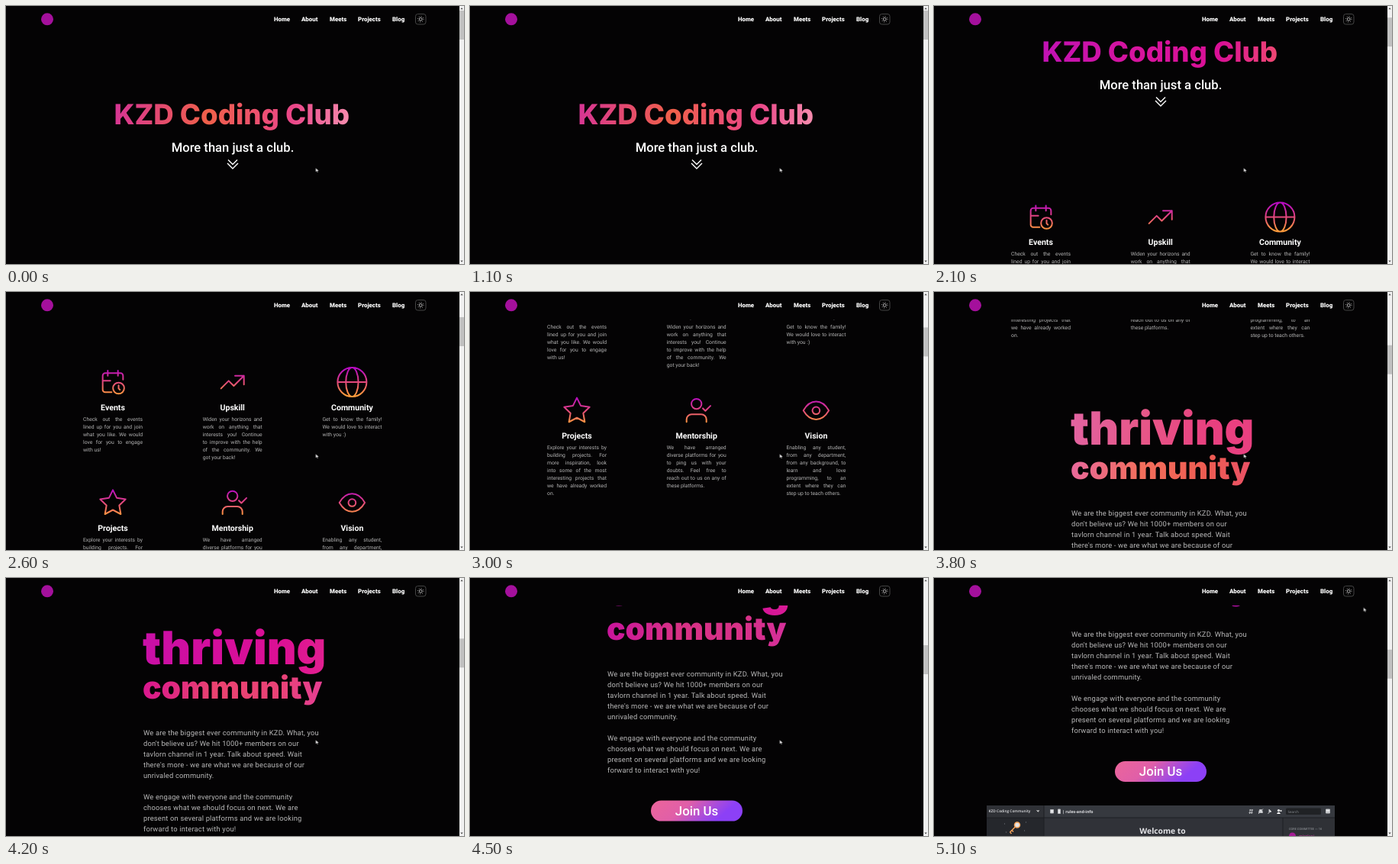
These frames come from a looping animation (600x338 px, 5.4 s). An HTML page:

```html
<!DOCTYPE html>
<html lang="en">
<head>
<meta charset="utf-8">
<title>Coding club</title>
<style>
@property --scroll { syntax: "<number>"; inherits: true; initial-value: 0; }
@property --a { syntax: "<color>"; inherits: false; initial-value: #000; }
@property --b { syntax: "<color>"; inherits: false; initial-value: #000; }
@property --c { syntax: "<color>"; inherits: false; initial-value: #000; }
@property --d { syntax: "<color>"; inherits: false; initial-value: #000; }

html, body { margin: 0; width: 100%; height: 100%; overflow: hidden; background: #040304; }
#stage {
  position: relative; width: 600px; height: 338px; overflow: hidden;
  background: #040304; color: #fff; font-family: Roboto, sans-serif;
  text-rendering: geometricPrecision;
  animation: scroll 5.4s infinite;
}
#stage * { position: absolute; margin: 0; white-space: nowrap; }
#stage svg, #stage svg * { position: static; }
#stage svg { position: absolute; left: 0; top: 0; }
#page { left: 0; top: 0; width: 594px; height: 1140px; transform: translateY(calc(var(--scroll) * -1px)); }

@keyframes scroll {
  0% { --scroll: 0; }
  29.62% { --scroll: 0; animation-timing-function: steps(5); }
  38.88% { --scroll: 82; animation-timing-function: steps(5); }
  48.14% { --scroll: 240.5; animation-timing-function: steps(8); }
  62.96% { --scroll: 482; animation-timing-function: steps(8); }
  77.77% { --scroll: 655; animation-timing-function: steps(5); }
  87.03%, 100% { --scroll: 784; }
}

/* Gradient lettering */
.glow {
  font: 900 36.6px/1.2 Inter, sans-serif; color: transparent;
  background: linear-gradient(100deg, var(--a), var(--b) 40%, var(--c) 75%, var(--d));
  -webkit-background-clip: text; background-clip: text;
}
#title { left: 295.8px; top: 120.7px; translate: -50% 0; font-weight: 800; animation: title 5.4s infinite; }
#thriving { left: 179px; top: 711.2px; font-size: 60px; animation: thriving 5.4s infinite; }
#community { left: 179px; top: 773.7px; font-size: 40.8px; animation: community 5.4s infinite; }
@keyframes title {
  0%, 29.62% { --a: #d63496; --b: #f0604a; --c: #ea4688; --d: #f78fb0; animation-timing-function: steps(5); }
  38.88%, 100% { --a: #c012b4; --b: #d6149e; --c: #da1096; --d: #f04a70; }
}
@keyframes thriving {
  0%, 62.96% { --a: #f9b89c; --b: #fa9f74; --c: #f3706a; --d: #f06070; animation-timing-function: steps(8); }
  77.77% { --a: #c810a8; --b: #d40e9c; --c: #dc1094; --d: #e22090; animation-timing-function: steps(9); }
  94.44%, 100% { --a: #a810b8; --b: #b410b0; --c: #c010a8; --d: #c810a0; }
}
@keyframes community {
  0%, 62.96% { --a: #f8bcac; --b: #f99a48; --c: #f2762e; --d: #f06438; animation-timing-function: steps(8); }
  77.77% { --a: #d81490; --b: #ea4270; --c: #ea4276; --d: #e43e94; animation-timing-function: steps(9); }
  94.44%, 100% { --a: #a810b8; --b: #b010b0; --c: #b410ac; --d: #b810a8; }
}

.mid { left: 297px; translate: -50% 0; font-weight: 500; }
#tagline { top: 176.6px; font-size: 16.6px; }
#join { top: 1028.4px; font-size: 16.8px; }
.card { width: 78px; }
.card h3 { left: 39px; top: 0; translate: -50% 0; font-size: 10.6px; line-height: normal; }
.card p { left: 0; top: 17.5px; width: 78px; font-size: 6.8px; line-height: 10px; color: #b4b4b4; }
#stage .card span { position: static; display: block; white-space: normal; text-align: justify; text-align-last: justify; }
#stage .card span:last-child { text-align-last: left; }
#about { left: 180px; top: 851.8px; font-size: 9.4px; line-height: 14.07px; letter-spacing: .018em; color: #b8b8b8; }
#stage #about { white-space: pre; }

#nav { left: 0; top: 0; width: 594px; height: 36px; background: #040304; }
#nav b { top: 12.7px; font-size: 7.9px; font-weight: 800; line-height: normal; }
#bar { left: 594px; top: 0; width: 6px; height: 338px; background: #f1f1f1; }
#thumb { left: 0; top: 6px; width: 6px; height: 38px; background: #c1c1c1; transform: translateY(calc(var(--scroll) * .112px)); }
#pointer { animation: pointer 5.4s step-end infinite; }
@keyframes pointer {
  0% { transform: translate(405.5px, 212px); }
  87.03% { transform: translate(409px, 207px); }
  88.88% { transform: translate(440px, 172px); }
  90.73% { transform: translate(524px, 92px); }
  92.58% { transform: translate(574px, 48px); }
  94.44%, 100% { transform: translate(562.5px, 38.5px); }
}
</style>
</head>
<body>
<div id="stage">
  <div id="page">
    <svg width="594" height="1140" fill="none">
      <defs>
        <linearGradient id="ink" gradientUnits="userSpaceOnUse" x1="0" y1="2" x2="0" y2="22">
          <stop stop-color="#b80cc0"/><stop offset=".5" stop-color="#e2487c"/><stop offset="1" stop-color="#ff9a3c"/>
        </linearGradient>
        <linearGradient id="pill" x2="1" y2=".25">
          <stop stop-color="#ec659a"/><stop offset=".42" stop-color="#e05fa8"/><stop offset=".72" stop-color="#a84cdc"/><stop offset=".9" stop-color="#8c40f6"/>
        </linearGradient>
      </defs>
      <path d="M291 201.5l6 6 6-6M290 206l7 7 7-7" stroke="#fff" stroke-width="1.4"/>
      <g id="icons" stroke="url(#ink)" stroke-width="1.2" stroke-linecap="round" stroke-linejoin="round"></g>
      <rect x="237" y="1024" width="120" height="27" rx="13.5" fill="url(#pill)"/>

      <g transform="translate(0 1082)" font-family="Open Sans, sans-serif" font-size="4.8" font-weight="600" fill="#e4e5e8">
        <path fill="#2f3136" d="M69 0h456v58H69z"/>
        <path fill="#36393f" d="M144 0h381v16H144z"/>
        <path fill="#25272c" d="M69 16h75v42H69z"/>
        <path fill="#303238" d="M144 16h313v42H144z"/>
        <path stroke="#1d1f23" d="M69 16h456M144 0v58M457 16v42"/>
        <text x="71.5" y="9.3">KZD Coding Community</text>
        <path stroke="#ccc" d="M134.5 6.5l1.7 1.7 1.7-1.7"/>
        <path stroke="#b5b7bb" d="M152.5 5.5h4V10h-4zM162.5 5h3v5.5h-3z"/>
        <text x="168" y="9.8" font-size="5.2" font-weight="700">| rules-and-info</text>
        <path stroke="#b9bbbe" d="M413 6h5M412.5 9.5h5M414.5 5l-1 6M417 5l-1 6M425.5 9.5h5l-1-4h-3zM425 11l6-6.5M437.5 11l2.5-3M439 5l3 3-3 1z"/>
        <g fill="#fff"><circle cx="451.5" cy="6.5" r="1.6"/><path d="M449 11q2.5-4.5 5 0z"/><circle cx="454.5" cy="7" r="1.1"/></g>
        <rect x="461" y="3.5" width="46" height="8.5" rx="1.5" fill="#202225"/>
        <text x="463.5" y="9.5" font-size="4.5" font-weight="400" fill="#8e9297">Search</text>
        <path stroke="#b9bbbe" d="M513.5 5h5v5h-5zM513.5 8.5h5"/>
        <g stroke="#f5a45c" stroke-width="1.5"><circle cx="109" cy="25.5" r="3.5"/><path d="M106.5 28l-7 7M102 32.5l2 2M99.5 35l2 2"/></g>
        <path stroke="#777a82" d="M92 24h1M118 33h1M94 35h1M120 22h1"/>
        <text x="299.5" y="37" font-size="10.3" font-weight="700" text-anchor="middle">Welcome to</text>
        <text x="465" y="31.5" font-size="3.8" fill="#8e9297">CORE COMMITTEE — 16</text>
        <circle cx="469.5" cy="40" r="4.5" fill="#a41c94"/>
        <text x="478" y="41.5" font-size="5" fill="#c73aa0">mirolani</text>
      </g>
    </svg>
    <div id="title" class="glow">KZD Coding Club</div>
    <div id="tagline" class="mid">More than just a club.</div>
    <div id="thriving" class="glow">thriving</div>
    <div id="community" class="glow">community</div>
    <p id="about">We are the biggest ever community in KZD. What, you
don't believe us? We hit 1000+ members on our
tavlorn channel in 1 year. Talk about speed. Wait
there's more - we are what we are because of our
unrivaled community.

We engage with everyone and the community
chooses what we should focus on next. We are
present on several platforms and we are looking
forward to interact with you!</p>
    <div id="join" class="mid">Join Us</div>
  </div>
  <div id="nav">
    <b style="left:351px">Home</b><b style="left:387px">About</b><b style="left:424px">Meets</b><b style="left:461px">Projects</b><b style="left:506px">Blog</b>
    <svg width="594" height="36" fill="none">
      <circle cx="54" cy="17.3" r="8" fill="#a4109c"/>
      <rect x="536.5" y="10.5" width="13.5" height="13.5" rx="3" stroke="#444"/>
      <g stroke="#ddd"><circle cx="543.2" cy="17.3" r="1.9" stroke-width=".8"/><circle cx="543.2" cy="17.3" r="3.7" stroke-dasharray=".8 2.106"/></g>
    </svg>
  </div>
  <div id="bar">
    <div id="thumb"></div>
    <svg width="6" height="338" fill="#505050"><path d="M1.2 4.3h3.6L3 2.3zM1.2 333.5h3.6l-1.8 2z"/></svg>
  </div>
  <svg id="pointer" width="6" height="8"><path d="M.3.3v5l1.2-1 .8 1.8.9-.4-.8-1.7h1.7z" fill="#fff" stroke="#222" stroke-width=".3"/></svg>
</div>
<script>
const ring = (x, y, r, ry = r) => `M${x - r} ${y}a${r} ${ry} 0 1 0 ${2 * r} 0a${r} ${ry} 0 1 0 ${-2 * r} 0`;

// Name, icon on a 24-unit grid, lines of text
const cards = [
  ["Events",
    "M11 20H6a2 2 0 0 1-2-2V7a2 2 0 0 1 2-2h12a2 2 0 0 1 2 2v3M8 3v4M16 3v4M4 11h6M16.5 14.5v2.5l1 1" + ring(16.5, 16.8, 4.4),
    "Check out the events|lined up for you and join|what you like. We would|love for you to engage|with us!"],
  ["Upskill", "M3 17l6-6 4 4 8-8M14 7h7v7",
    "Widen your horizons and|work on anything that|interests you! Continue|to improve with the help|of the community. We|got your back!"],
  ["Community", ring(12, 12, 11.4) + ring(12, 12, 4.9, 11.4) + "M.6 12h22.8",
    "Get to know the family!|We would love to interact|with you :)"],
  ["Projects", "M12 17.7l-6.2 3.3L7 14.1 2 9.3l6.9-1L12 2l3.1 6.3 6.9 1-5 4.8 1.2 6.9z",
    "Explore your interests by|building projects. For|more inspiration, look|into some of the most|interesting projects that|we have already worked|on."],
  ["Mentorship", ring(12, 6.8, 4) + "M4.2 21v-2a4 4 0 0 1 4-4h7.6a4 4 0 0 1 4 4v2M17 10.3l2 2 4-4",
    "We have arranged|diverse platforms for you|to ping us with your|doubts. Feel free to|reach out to us on any of|these platforms."],
  ["Vision", ring(12, 12, 2.9) + "M22 12c-2.7 4.7-6 7-10 7s-7.3-2.3-10-7c2.7-4.7 6-7 10-7s7.3 2.3 10 7",
    "Enabling any student,|from any department,|from any background, to|learn and love|programming, to an|extent where they can|step up to teach others."],
];

const page = document.getElementById("page");
const icons = document.getElementById("icons");
cards.forEach(([name, path, text], i) => {
  const x = 101 + 156.7 * (i % 3), y = 158 * Math.floor(i / 3);
  const lines = text.split("|").map(line => `<span>${line}</span>`).join("");
  page.insertAdjacentHTML("beforeend",
    `<div class="card" style="left:${x}px;top:${y + 384.5}px"><h3>${name}</h3><p>${lines}</p></div>`);
  icons.insertAdjacentHTML("beforeend",
    `<path d="${path}" transform="translate(${x + 19} ${y + 338.5}) scale(1.667)"/>`);
});
</script>
</body>
</html>
```
